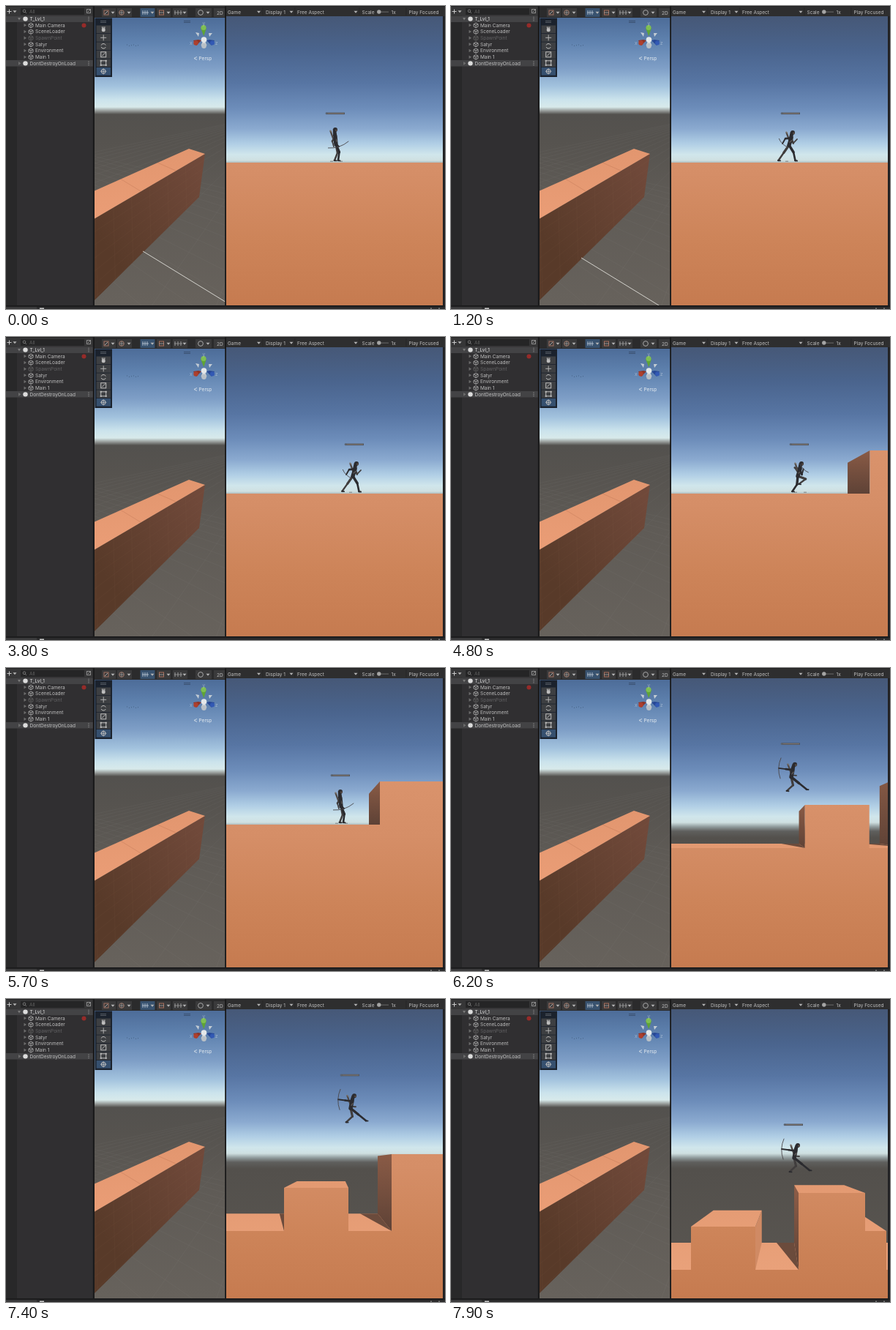
An HTML page with a canvas for the animation above (8 s loop, 600 px wide and 414 px high).

```html
<!DOCTYPE html>
<html lang="en">
<head>
<meta charset="utf-8">
<title>Platformer in the editor</title>
<style>
html, body { margin: 0; width: 100%; height: 100%; overflow: hidden; background: #1e1e1f; }
canvas { display: block; width: 600px; height: 414px; }
</style>
</head>
<body>
<canvas id="stage" width="600" height="414"></canvas>
<script>
const ctx = document.getElementById('stage').getContext('2d');
const LOOP = 8000, STEP = 100;
const FONT = '6.5px Inter, Roboto, sans-serif';

// ---------- drawing helpers ----------
function rect(x, y, w, h, fill) {
  ctx.fillStyle = fill;
  ctx.fillRect(x, y, w, h);
}
function path(pts, close) {
  ctx.beginPath();
  pts.forEach(([x, y], i) => i ? ctx.lineTo(x, y) : ctx.moveTo(x, y));
  if (close) ctx.closePath();
}
function poly(pts, fill) {
  path(pts, true);
  ctx.fillStyle = fill;
  ctx.fill();
}
function line(pts, color, width = 1) {
  path(pts);
  ctx.strokeStyle = color;
  ctx.lineWidth = width;
  ctx.stroke();
}
function disc(x, y, r, fill) {
  ctx.beginPath();
  ctx.arc(x, y, r, 0, Math.PI * 2);
  ctx.fillStyle = fill;
  ctx.fill();
}
function ring(x, y, r, color, from = 0, to = Math.PI * 2) {
  ctx.beginPath();
  ctx.arc(x, y, r, from, to);
  ctx.strokeStyle = color;
  ctx.lineWidth = 1;
  ctx.stroke();
}
function box(x, y, w, h, color) {
  ctx.strokeStyle = color;
  ctx.lineWidth = 1;
  ctx.strokeRect(x, y, w, h);
}
function label(s, x, y, color = '#c0c0c0') {
  ctx.font = FONT;
  ctx.fillStyle = color;
  ctx.fillText(s, x, y);
}
function fade(y0, y1, stops) {
  const g = ctx.createLinearGradient(0, y0, 0, y1);
  stops.forEach(([at, c]) => g.addColorStop(Math.min(1, Math.max(0, (at - y0) / (y1 - y0))), c));
  return g;
}
function caret(x, y) {
  poly([[x - 2.5, y - 1.3], [x + 2.5, y - 1.3], [x, y + 1.7]], '#b4b4b4');
}
function clipTo(x, y, w, h, draw) {
  ctx.save();
  ctx.beginPath();
  ctx.rect(x, y, w, h);
  ctx.clip();
  draw();
  ctx.restore();
}

// ---------- motion ----------
// Smooth curve through [time, value] keys without overshoot.
function track(keys) {
  const slope = i => (keys[i + 1][1] - keys[i][1]) / (keys[i + 1][0] - keys[i][0]);
  const tangent = i => {
    if (i === 0 || i === keys.length - 1) return 0;
    const a = slope(i - 1), b = slope(i);
    return a * b <= 0 ? 0 : 2 * a * b / (a + b);
  };
  return t => {
    let i = 0;
    while (i < keys.length - 2 && t >= keys[i + 1][0]) i++;
    const [t0, v0] = keys[i], [t1, v1] = keys[i + 1];
    const d = t1 - t0, u = Math.min(1, Math.max(0, (t - t0) / d));
    const u2 = u * u, u3 = u2 * u;
    return v0 * (2 * u3 - 3 * u2 + 1) + v1 * (3 * u2 - 2 * u3) +
      d * (tangent(i) * (u3 - 2 * u2 + u) + tangent(i + 1) * (u3 - u2));
  };
}
const heroX = track([[0, -489], [1, -489], [1.1, -482], [1.2, -472], [5.25, -62], [5.4, -54],
  [5.85, -54], [6.1, -33], [6.45, 16], [6.7, 32], [7.05, 47], [7.4, 90], [7.9, 140], [8, 150]]);
const heroH = track([[0, 0], [5.9, 0], [6.05, 42], [6.25, 80], [6.45, 84], [6.65, 60], [7.1, 60],
  [7.3, 120], [7.5, 163], [7.6, 168], [7.75, 158], [7.9, 131], [8, 112]]);
const lead = track([[0, 2], [1, 2], [1.2, 16], [1.5, 25], [2, 28], [5.3, 28], [5.7, 9], [5.85, 5],
  [6.2, 16], [6.45, 20], [6.7, 12], [7.05, 12], [7.4, 22], [7.9, 20], [8, 20]]);
const rise = track([[0, 0], [5.9, 0], [6.2, 32], [6.5, 74], [6.7, 80], [6.95, 67], [7.12, 64],
  [7.4, 103], [7.65, 146], [7.9, 156], [8, 154]]);

// ---------- hierarchy panel ----------
function cube(x, y, c) {
  line([[x, y - 3], [x + 3, y - 1.5], [x + 3, y + 1.8], [x, y + 3.4], [x - 3, y + 1.8],
    [x - 3, y - 1.5], [x, y - 3]], c, .8);
  line([[x - 3, y - 1.5], [x, y], [x + 3, y - 1.5]], c, .8);
  line([[x, y], [x, y + 3.4]], c, .8);
}
function drawHierarchy() {
  rect(0, 0, 120, 410, '#302f31');
  rect(0, 0, 120, 13, '#363637');
  rect(0, 13, 15, 397, '#282829');
  rect(0, 13.5, 119, 8.5, '#434345');
  rect(0, 74, 119, 8.5, '#434345');
  rect(0, 0, 120, 1, '#222');
  line([[1.5, 7.5], [7.5, 7.5]], '#c8c8c8');
  line([[4.5, 4.5], [4.5, 10.5]], '#c8c8c8');
  caret(12, 7.5);
  rect(20, 3, 87, 9, '#252526');
  ring(25, 6.8, 1.8, '#777');
  line([[26.3, 8.2], [28, 10]], '#777');
  label('All', 32, 10, '#606060');
  box(110.5, 4.5, 5, 5, '#8c8c8c');
  line([[112, 8], [116, 4]], '#8c8c8c');

  const rows = ['T_Lvl_1', 'Main Camera', 'SceneLoader', 'SpawnPoint', 'Satyr', 'Environment',
    'Main 1', 'DontDestroyOnLoad'];
  rows.forEach((name, i) => {
    const y = 17.6 + i * 8.68, scene = i === 0 || i === 7, dim = i === 3;
    const ix = scene ? 26.5 : 34;
    if (i === 0) poly([[16, y - 1.5], [20, y - 1.5], [18, y + 2]], '#7a7a7a');
    else {
      const ax = scene ? 17 : 24.5;
      poly([[ax, y - 2.3], [ax + 3.5, y], [ax, y + 2.3]], '#6c6c6c');
    }
    if (scene) disc(ix, y, 3.2, '#dcdcdc');
    else cube(ix, y, dim ? '#666' : '#b5b5b5');
    label(name, scene ? 32.5 : 40, y + 2.4, dim ? '#636365' : i ? '#c0c0c0' : '#e6e6e6');
    if (scene) [-2.3, 0, 2.3].forEach(d => rect(112.5, y + d - .5, 1, 1, '#aaa'));
  });
  disc(106.5, 26.5, 3, '#962b29');
  rect(118.8, 0, 2.2, 410, '#1b1b1c');
}

// ---------- scene view ----------
const VP_A = [385, 143], VP_B = [-133, 143];
function drawScene(camX) {
  rect(120, 14, 180, 396, fade(14, 410, [[14, '#4c6b97'], [50, '#6083b0'], [85, '#7f9fc7'],
    [110, '#a3c3de'], [128, '#cbe3ec'], [138, '#d8eaeb'], [143, '#999e9c'], [148, '#53514e'],
    [185, '#56534f'], [260, '#5f5b56'], [410, '#67625c']]));

  clipTo(120, 147, 180, 263, () => {
    for (let i = -5; i < 14; i++) {
      line([VP_A, [i * 95 - 480, 430]], 'rgba(190,190,185,.07)', .7);
      line([VP_B, [i * 75 + 60, 430]], 'rgba(190,190,185,.07)', .7);
    }
  });

  const side = ctx.createLinearGradient(130, 320, 265, 225);
  side.addColorStop(0, '#583a29');
  side.addColorStop(1, '#70493a');
  const face = [[120, 291], [272, 202], [264, 261], [120, 403]];
  const top = [[120, 253], [250, 195], [272, 202], [120, 291]];
  poly(face, side);
  poly(top, fade(195, 291, [[195, '#e2966f'], [291, '#ea9d76']]));
  ctx.save();
  path(face, true);
  ctx.clip();
  for (let i = 0; i < 7; i++) {
    line([[120, 309 + i * 18], [272, 210 + i * 10]], 'rgba(150,110,85,.12)', .7);
    line([[120 + i * 25, 200], [125 + i * 25, 400]], 'rgba(150,110,85,.12)', .7);
  }
  ctx.restore();
  line([[157, 236.5], [184, 253]], 'rgba(160,90,62,.35)', .7);
  line([[207, 214], [232, 225]], 'rgba(160,90,62,.35)', .7);

  // Near edge of the game camera's frame, sliding out as the camera travels.
  const shift = (camX + 491) * 3;
  if (shift < 70) clipTo(120, 16, 180, 393, () => {
    const x = 187 - shift, y = 335 + shift;
    line([[x, y], [x + 150, y + 92]], 'rgba(245,245,240,.85)', .9);
  });

  drawGizmo();
  for (let i = 0; i < 6; i++) rect(165 + i * 3, 52.5 + (i * 5 % 3) * .7, 1, 1, 'rgba(40,60,90,.5)');
  drawTools();
  drawSceneBar();
  rect(299.2, 0, 2, 410, '#19191a');
}
function drawGizmo() {
  rect(243, 20, 9, 1, '#3a5070');
  rect(243, 22, 9, 1, '#3a5070');
  poly([[263, 42], [259, 36], [264, 37]], '#c3ccd4');
  poly([[278, 42], [282, 37], [277, 37]], '#c3ccd4');
  poly([[266.5, 54], [274.5, 54], [270.5, 45]], '#d0d4d7');
  disc(270.5, 54.5, 3.4, '#b9c0c6');
  poly([[266, 30], [274, 30], [270.3, 41]], '#5fa436');
  disc(270, 29.5, 3.5, '#7fbf52');
  poly([[256, 47], [263, 46], [267, 47], [260, 54]], '#8f3325');
  disc(259.5, 50.5, 3.2, '#ad3f2d');
  poly([[285, 47], [278, 46], [274, 47], [281, 54]], '#264795');
  disc(282, 50.5, 3, '#3259b4');
  disc(270.5, 46, 3.8, '#e4e8ea');
  label('y', 268.4, 26, 'rgba(225,232,240,.5)');
  label('x', 251, 53, 'rgba(225,232,240,.5)');
  label('z', 286, 53, 'rgba(225,232,240,.5)');
  line([[261, 69.5], [257, 71.5], [261, 73.5]], '#e0e8ee', .8);
  label('Persp', 263.5, 74, '#e6ecf1');
}
function drawTools() {
  rect(121.5, 16.5, 23.5, 80.5, '#1b222d');
  rect(129, 20, 8, 1, '#555b63');
  rect(129, 22, 8, 1, '#555b63');
  for (let i = 0; i < 6; i++) rect(123.5, 26.5 + i * 11.5, 19.5, 10.7, i < 5 ? '#3d3f42' : '#36506f');
  const c = '#bdbdbd', x = 133.2;
  const y = i => 31.8 + i * 11.5;
  disc(x, y(0) + 1, 2.5, c);
  for (let i = -1; i < 2; i++) line([[x + i * 1.5, y(0)], [x + i * 1.8, y(0) - 3.5]], c, 1);
  [1, 5].forEach(i => {
    line([[x - 4, y(i)], [x + 4, y(i)]], c, .9);
    line([[x, y(i) - 4], [x, y(i) + 4]], c, .9);
  });
  ring(x, y(5), 3, c);
  ring(x, y(2), 3.3, c, .4, 2.8);
  ring(x, y(2), 3.3, c, 3.5, 5.9);
  box(x - 3.5, y(3) - 3.5, 7, 7, c);
  line([[x - 2, y(3) + 2], [x + 3, y(3) - 3]], c);
  box(x - 3.5, y(4) - 3, 7, 6, c);
  [-3.5, 3.5].forEach(a => [-3, 3].forEach(b => rect(x + a - 1, y(4) + b - 1, 2, 2, c)));
}
function drawSceneBar() {
  rect(120, 0, 180, 16, '#2b2b2c');
  const c = '#a8a8a8';
  [[131, 19], [152, 20], [206, 19], [228, 20], [259, 22], [284, 15]]
    .forEach(([x, w]) => rect(x, 3, w, 12, '#3a3a3b'));
  rect(183.5, 3, 20, 12, '#38526f');
  box(134, 6, 6, 6, '#a37263');
  line([[135, 11], [139, 7]], c);
  ring(158, 9, 3.3, '#a37b6c');
  line([[155, 9], [161, 9]], c, .7);
  line([[158, 6], [158, 12]], c, .7);
  [187, 190, 193].forEach(x => line([[x, 6], [x, 12]], '#c4d0dc', .8));
  line([[186, 9], [195, 9]], '#c4d0dc', .8);
  box(209.5, 6, 6, 6, '#a86f5c');
  line([[209, 9], [216, 9]], c, .8);
  [231, 235, 239].forEach(x => line([[x, 6], [x, 12]], c, .9));
  line([[230, 9], [241, 9]], c, .7);
  ring(266, 9, 3.4, c);
  [146, 168, 200, 222, 244, 276].forEach(x => caret(x, 9));
  label('2D', 288, 11.5);
}

// ---------- hero ----------
// Pose: head, neck, hip, two feet, bow hand, free hand (x, y each), bow angle, bow half length.
const POSES = {
  idle: () => [0, -43, 0, -36, 1, -23, 4, -1, -1, -1, 5, -20, -2, -20, -18, 14.5],
  kick: () => [2, -41, 0, -36, 0, -20, 25, -9, -2, 0, -14, -39, 5, -25, 117, 14],
  air: () => [6, -37, 3, -32, 1, -20, 22, -3, -5, -1, -16, -32, 8, -22, 92, 14],
  run: t => {
    const a = (t - 1.2) / .433 * Math.PI * 2, c = Math.cos(a), s = Math.sin(a);
    return [3, -39, 1, -34, -2, -22, -5 + 11.5 * c, -1 - 11 * Math.max(0, -s),
      -5 - 11.5 * c, -1 - 11 * Math.max(0, s), 1 - 12 * c, -29.5 + 5.5 * c,
      1 + 8 * c, -28 - 2 * c, 45, 8];
  }
};
const ACTS = [[0, 'idle'], [1, 'idle'], [1.1, 'run'], [5.35, 'run'], [5.5, 'idle'], [5.85, 'idle'],
  [5.95, 'run'], [6.1, 'air'], [6.5, 'air'], [6.65, 'kick'], [6.75, 'kick'], [6.9, 'run'],
  [7.05, 'run'], [7.2, 'air'], [8, 'air']];
function poseAt(t) {
  let i = 0;
  while (i < ACTS.length - 2 && t >= ACTS[i + 1][0]) i++;
  const [t0, a] = ACTS[i], [t1, b] = ACTS[i + 1];
  const u = (t - t0) / (t1 - t0), next = POSES[b](t);
  return POSES[a](t).map((v, k) => v + (next[k] - v) * u);
}
function limb([ax, ay], [bx, by], len, bend, color, width) {
  const dx = bx - ax, dy = by - ay, d = Math.hypot(dx, dy) || 1;
  const off = Math.sqrt(Math.max(0, len * len - d * d / 4)) * bend;
  const mid = [(ax + bx) / 2 + dy / d * off, (ay + by) / 2 - dx / d * off];
  line([[ax, ay], mid], color, width + .8);
  line([mid, [bx, by]], color, width);
}
function drawHero(x, y, t) {
  const p = poseAt(t), at = i => [p[i * 2], p[i * 2 + 1]];
  const [head, neck, hip, footA, footB, bowHand, freeHand] = [0, 1, 2, 3, 4, 5, 6].map(at);
  const dark = '#2b2b2f', mid = '#403d3d';
  ctx.save();
  ctx.translate(x, y);
  ctx.lineCap = ctx.lineJoin = 'round';
  const shoulder = [neck[0], neck[1] + 2.5];
  limb(shoulder, freeHand, 7.5, -1, mid, 1.8);
  line([[neck[0] - 6.5, neck[1] - 5], [neck[0] - 2.5, neck[1] + 6]], '#4f4946', 2.2);
  line([[neck[0] - 7, neck[1] - 6], [neck[0] - 5, neck[1] - 4]], '#83786e', 1.1);
  limb(hip, footB, 11.5, 1, mid, 2.4);
  limb(hip, footA, 11.5, 1, dark, 2.6);
  [footA, footB].forEach(([fx, fy]) => line([[fx - .5, fy], [fx + 2.6, fy + .4]], dark, 1.8));
  line([shoulder, hip], dark, 5.4);
  line([[shoulder[0] + 1, shoulder[1] + 3], [hip[0] + 1, hip[1] - 4]], '#5b5654', 1.5);
  poly([[head[0] - 3.2, head[1] - 1], [head[0] + 1, head[1]], [neck[0] + 2.5, neck[1] + 2],
    [neck[0] - 3, neck[1] + 2]], dark);
  disc(head[0], head[1], 3, dark);
  disc(head[0] + 1.4, head[1] + .8, 1.3, '#5a4d46');
  limb(shoulder, bowHand, 8, -1, dark, 1.9);

  const a = p[14] * Math.PI / 180, half = p[15];
  const ux = Math.cos(a) * half, uy = Math.sin(a) * half;
  const bx = bowHand[0] + Math.sin(a) * half * .18, by = bowHand[1] - Math.cos(a) * half * .18;
  ctx.beginPath();
  ctx.moveTo(bx - ux, by - uy);
  ctx.quadraticCurveTo(bx - Math.sin(a) * half * .4, by + Math.cos(a) * half * .4, bx + ux, by + uy);
  ctx.strokeStyle = '#4a474a';
  ctx.lineWidth = .9;
  ctx.stroke();
  ctx.restore();

  rect(x - 12.5, y - 66.5, 25.5, 2.6, '#50555e');
  rect(x - 10.5, y - 65.8, 22.5, 1.1, '#7d746d');
  disc(x - 12, y - 65.2, 1.4, '#5c6470');
}

// ---------- game view ----------
const CENTER = 448, VANISH = 451, HORIZON = 222, FAR = .75;
const BLOCKS = [[0, 88, 59], [147, 238, 105], [238, 267, 53]];
function drawGame(t, camX, camY) {
  const floor = 214 + camY;
  const near = (x, h) => [CENTER + x - camX, floor - h];
  const far = (x, h) => {
    const [nx, ny] = near(x, h);
    return [VANISH + (nx - VANISH) * FAR, HORIZON + (ny - HORIZON) * FAR];
  };

  rect(301, 14, 296, 396, fade(14, 410, [[14, '#465877'], [60, '#4a648d'], [105, '#5775a3'],
    [140, '#6d8dba'], [168, '#8baad0'], [188, '#b0cee5'], [203, '#d0e6ec'], [211, '#cfe0e1'],
    [217, '#8f9a9b'], [223, '#5f5f5d'], [232, '#53504c'], [410, '#5b5752']]));

  const topFill = fade(225, 370, [[225, '#e29870'], [370, '#e9a17a']]);
  const frontFill = fade(150, 408, [[150, '#da936c'], [230, '#d58e67'], [320, '#cd8459'], [408, '#c67b50']]);
  if (floor > HORIZON) {
    const back = far(0, 0)[1];
    rect(301, back, 296, floor - back, topFill);
    BLOCKS.slice(0, 2).forEach(([l]) => poly([near(l, 0), far(l, 0), far(l - 32, 0)], '#6b4b3c'));
  }
  BLOCKS.forEach(([l, r, h]) => {
    const leftX = near(l, 0)[0], rightX = near(r, 0)[0];
    if (leftX > VANISH) {
      const y = near(l, h)[1];
      poly([near(l, h), far(l, h), far(l, 0), near(l, 0)],
        fade(y, floor, [[y, '#8a5b46'], [floor, '#5e4236']]));
    }
    if (rightX < VANISH) poly([near(r, h), far(r, h), far(r, 0), near(r, 0)], '#d08a64');
    if (floor - h > HORIZON) poly([near(l, h), far(l, h), far(r, h), near(r, h)], topFill);
  });
  BLOCKS.forEach(([l, r, h]) => {
    const [x, y] = near(l, h);
    rect(x, y, r - l, h + 1, frontFill);
  });
  rect(301, floor, 296, 410 - floor, frontFill);

  const x = CENTER + lead(t), h = heroH(t), y = 212 + camY - h;
  if (h < 1) {
    rect(x - 7, y - .3, 4, .9, 'rgba(70,55,50,.6)');
    rect(x + 6, y - .3, 4, .9, 'rgba(70,55,50,.6)');
  }
  drawHero(x, y, t);
}
function drawGameBar() {
  rect(301, 0, 299, 14, '#2e2e2f');
  rect(301, 0, 299, 1, '#212122');
  label('Game', 303, 10.5);
  label('Display 1', 355, 10.5);
  label('Free Aspect', 398, 10.5);
  label('Scale', 486.5, 10.5);
  label('1x', 526.5, 10.5);
  label('Play Focused', 550.5, 10.5);
  [345.5, 390, 478].forEach(x => caret(x, 8));
  [350.5, 394.5, 482.5, 546.5].forEach(x => rect(x, 2, .8, 11, '#252526'));
  rect(507, 7.6, 16, 1, '#6a6a6a');
  disc(509.8, 8, 2.7, '#a5a5a5');
  rect(597, 14, 3, 396, '#222224');
}
function drawFooter() {
  rect(0, 409, 600, 5, '#1c1c1d');
  rect(0, 411, 600, 3, '#2a2a2b');
  rect(0, 411, 42, 3, '#3a3a3b');
  rect(46, 412.5, 6, 1.5, '#c9c9c9');
  rect(580, 412.5, 2, 1.5, '#777');
  rect(591, 412.5, 2, 1.5, '#777');
}

function render(now) {
  const t = Math.floor((now % LOOP) / STEP) * STEP / 1000;
  const camX = heroX(t) - lead(t), camY = rise(t);
  rect(0, 0, 600, 414, '#1e1e1f');
  drawHierarchy();
  clipTo(121, 0, 180, 410, () => drawScene(camX));
  clipTo(301, 14, 296, 396, () => drawGame(t, camX, camY));
  drawGameBar();
  drawFooter();
}
const start = performance.now();
function tick() {
  render(performance.now() - start);
  requestAnimationFrame(tick);
}
tick();
</script>
</body>
</html>
```
